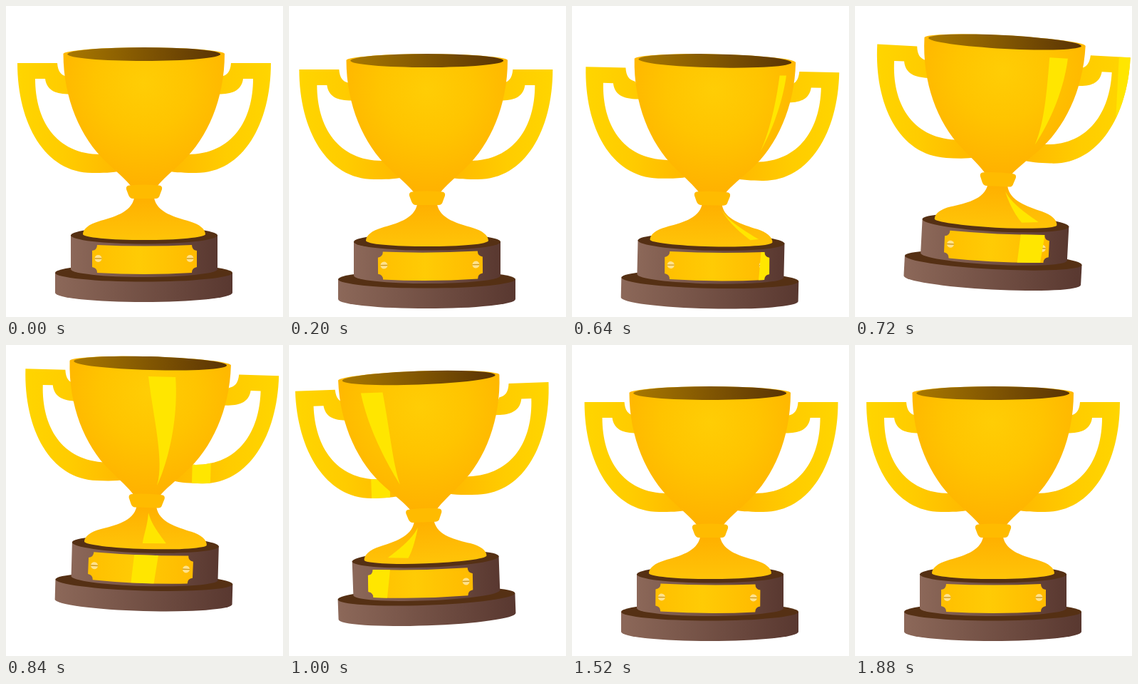
Write an HTML page that moves like this. It is 389 px wide and 436 px high and loops after 1.92 s.

```html
<!DOCTYPE html>
<html lang="en">
<head>
<meta charset="utf-8">
<title>Trophy</title>
<style>
  html, body { margin: 0; width: 100%; height: 100%; overflow: hidden; background: #fff; }
  svg { display: block; width: 389px; height: 436px; }
  .shine { fill: #ffe600; }
</style>
</head>
<body>
<svg viewBox="0 0 389 436">
  <defs>
    <radialGradient id="bowlFill" gradientUnits="userSpaceOnUse" cx="193" cy="108" r="150">
      <stop offset="0" stop-color="#ffcd05"/>
      <stop offset=".45" stop-color="#ffc400"/>
      <stop offset="1" stop-color="#ffb000"/>
    </radialGradient>
    <linearGradient id="insideFill">
      <stop offset="0" stop-color="#a87800"/>
      <stop offset="1" stop-color="#5a3404"/>
    </linearGradient>
    <linearGradient id="handleFill" gradientUnits="userSpaceOnUse" x1="16" y1="0" x2="160" y2="0">
      <stop offset="0" stop-color="#ffd500"/>
      <stop offset=".45" stop-color="#ffcc00"/>
      <stop offset="1" stop-color="#ffb800"/>
    </linearGradient>
    <linearGradient id="footFill" x2="0" y2="1">
      <stop offset="0" stop-color="#ffb000"/>
      <stop offset="1" stop-color="#ffc408"/>
    </linearGradient>
    <linearGradient id="plateFill">
      <stop offset="0" stop-color="#ffbf00"/>
      <stop offset=".45" stop-color="#ffcb05"/>
      <stop offset="1" stop-color="#ffba00"/>
    </linearGradient>
    <linearGradient id="woodFill">
      <stop offset="0" stop-color="#8c6859"/>
      <stop offset="1" stop-color="#593830"/>
    </linearGradient>
    <path id="handle" d="M16 80H72C73 92 77 97 86 99L96 123.5H86C68 123 57 117 55 102H41C41 160 70 208 133 208L170 212L162 231C150 234 135 234 121 234C55 234 16 165 16 80Z"/>
    <path id="plateShape" d="M128 335Q194.5 338 261 335Q261 342 268 343V366Q261 367 261 374Q194.5 378 128 374Q128 367 121 366V343Q128 342 128 335Z"/>
    <g id="screw">
      <circle r="5" fill="#ffe28c"/>
      <path d="M-5 0H5" stroke="#cf9a1c" stroke-width="1.4"/>
    </g>
    <clipPath id="handleClip">
      <use href="#handle"/>
      <use href="#handle" transform="matrix(-1 0 0 1 388 0)"/>
    </clipPath>
    <clipPath id="plateClip"><use href="#plateShape"/></clipPath>
  </defs>

  <g id="trophy">
    <path d="M69 374V402A124.5 13 0 0 0 318 402V374Z" fill="url(#woodFill)"/>
    <ellipse cx="193.5" cy="374" rx="124.5" ry="12.5" fill="#553014"/>
    <path d="M91 321V369A103 11 0 0 0 297 369V321Z" fill="url(#woodFill)"/>
    <ellipse cx="194" cy="321.5" rx="103" ry="12" fill="#553014"/>

    <g id="plate">
      <use href="#plateShape" fill="url(#plateFill)"/>
      <use href="#screw" x="129.5" y="354"/>
      <use href="#screw" x="258.5" y="354"/>
      <g clip-path="url(#plateClip)">
        <path id="plateShine" class="shine" d="M-15 330H19L13 380H-19Z"/>
      </g>
    </g>

    <path d="M180 269C176 290 150 296 130 302C116 306 108 313 108 320A86 8 0 0 0 280 320C280 313 272 306 258 302C238 296 212 290 208 269Z" fill="url(#footFill)"/>
    <path id="footShine" class="shine"/>

    <g id="handles">
      <use href="#handle" fill="url(#handleFill)"/>
      <use href="#handle" fill="url(#handleFill)" transform="matrix(-1 0 0 1 388 0)"/>
      <g clip-path="url(#handleClip)">
        <rect id="handleShine" class="shine" x="-13" y="70" width="26" height="180"/>
      </g>
    </g>

    <path d="M80.5 67C80.5 130 105 185 140 218C156 233 168 243 175 252H213C220 243 232 233 248 218C283 185 307 130 307 67A113.3 9 0 0 0 80.5 67Z" fill="url(#bowlFill)"/>
    <ellipse cx="193.7" cy="67.5" rx="107.5" ry="9.5" fill="url(#insideFill)"/>
    <path id="bowlShine" class="shine"/>
    <path d="M173 251.5Q194 249.5 215 251.5Q220 252 219 257L216 265Q215 270 210 270H178Q174 270 172 265L169 257Q168 252 173 251.5Z" fill="#ffbb00"/>
  </g>
</svg>
<script>
const LOOP = 1920, STEP = 40, CX = 194, PEAK = 840;
const $ = id => document.getElementById(id);
const sin = deg => Math.sin(deg * Math.PI / 180);
const cos = deg => Math.cos(deg * Math.PI / 180);

// Progress of t from a to b, plain and eased at both ends.
const part = (t, a, b) => Math.min(1, Math.max(0, (t - a) / (b - a)));
const ease = (t, a, b) => (1 - cos(180 * part(t, a, b))) / 2;

// Crouch, leap, then a landing that slows down.
const lift = t => 21.2 * ease(t, 0, 440) - 63.2 * ease(t, 560, PEAK)
  + 42 * (1 - (1 - part(t, PEAK, 1480)) ** 2.3);
// Lean right, swing left, stand up.
const tilt = t => 3.1 * ease(t, 560, 740) - 5.7 * ease(t, 720, 1070) + 2.6 * ease(t, 1070, 1400);
// Turn about the upright axis, as pixels of shift at the front.
const spin = t => 10.7 * ease(t, 0, 480) - 19.4 * ease(t, 560, 920) + 8.7 * ease(t, 1080, 1880);

const glow = t => ease(t, 560, 640) - ease(t, 1120, 1290);
const angle = t => 65 - 119 * ease(t, 560, 1140);
const spread = t => 2 + 8 * ease(t, 560, 760);

const bowlR = y => 113 * Math.sqrt(1 - ((y - 68) / 186) ** 1.5);
const footR = y => 14 + 72 * ((y - 270) / 48) ** 1.6;

// Highlight on a round body, wide at one end and pointed at the other.
function wedge({ phi, half, wide, tip, radius, sag = 0, twist = 0 }) {
  const left = [], right = [], n = 20;
  for (let i = 0; i <= n; i++) {
    const u = i / n, y = wide + (tip - wide) * u;
    const mid = phi + twist * u, h = half * (1 - u * u);
    const at = a => `${CX + radius(y) * sin(a)} ${y + sag * (1 - u) * cos(a)}`;
    left.push(at(mid - h));
    right.unshift(at(mid + h));
  }
  return "M" + left.concat(right).join("L") + "Z";
}

const move = (id, value) => $(id).setAttribute("transform", value);

function draw(now) {
  const t = Math.floor(now % LOOP / STEP) * STEP;
  const s = spin(t), phi = angle(t), half = spread(t), sweep = t - PEAK;
  move("trophy", `translate(0 ${lift(t)}) rotate(${tilt(t)} ${CX} 388)`);
  move("handles", `translate(${-.42 * s} 0)`);
  move("plate", `translate(${s} 0) rotate(${-.11 * s} 194.5 354)`);
  move("plateShine", `translate(${CX - .43 * sweep - s} 0)`);
  move("handleShine", `translate(${CX + 73 - .85 * sweep} 0)`);
  $("bowlShine").setAttribute("d", wedge({
    phi, half, wide: 86, tip: 240 - 64 * sin(phi) ** 2, radius: bowlR, twist: 12 * cos(phi) ** 3
  }));
  $("footShine").setAttribute("d", wedge({
    phi: phi * .9 + 2, half: half + 3, wide: 313, tip: 277, radius: footR, sag: 7
  }));
  for (const el of document.querySelectorAll(".shine")) el.setAttribute("opacity", glow(t));
}

const start = performance.now();
function tick() {
  draw(performance.now() - start);
  requestAnimationFrame(tick);
}
tick();
</script>
</body>
</html>
```
